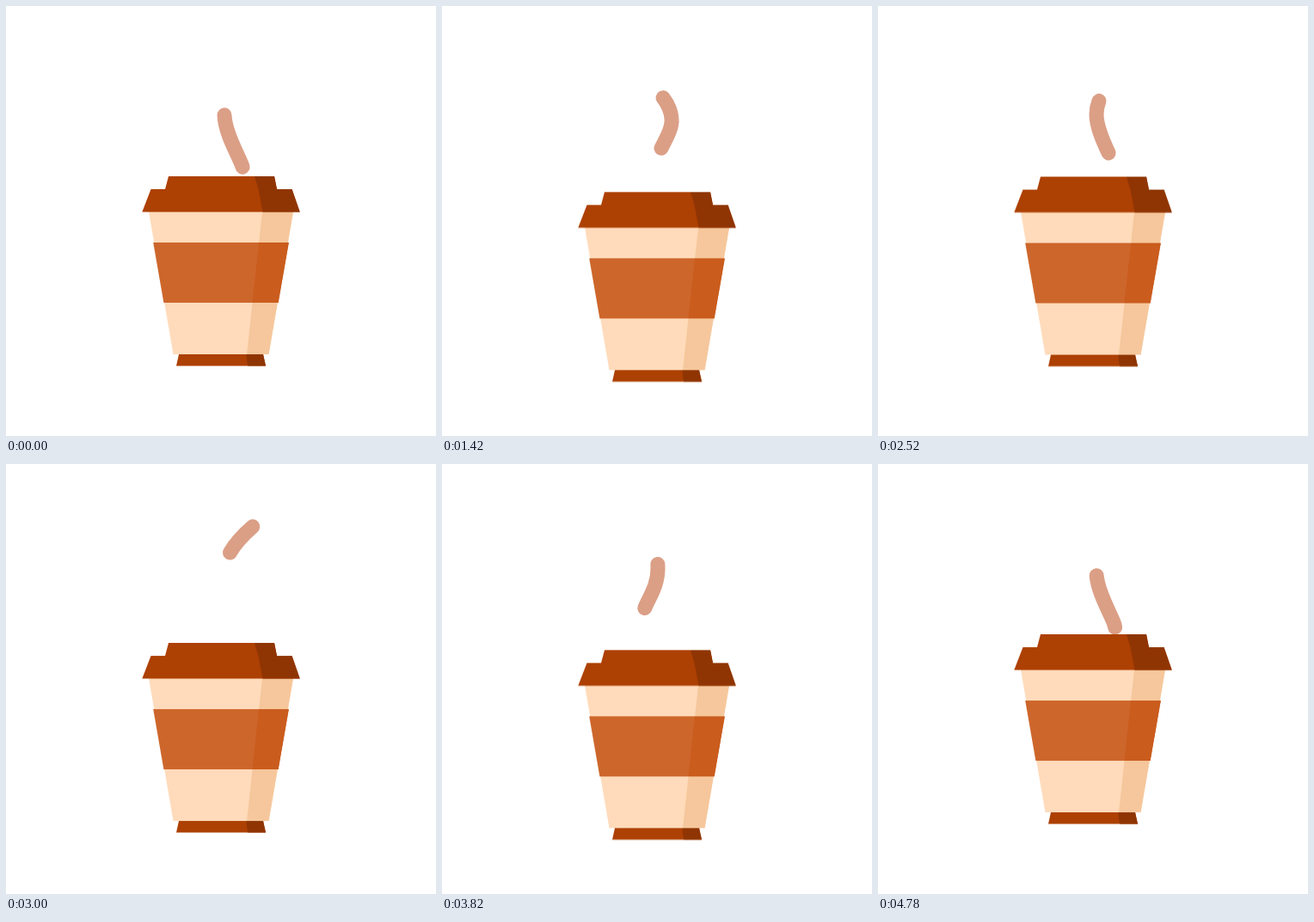
Recreate the animation shown at these times as an HTML page. Size 500 px wide and 500 px high, loop 4.8 s.

```html
<!DOCTYPE html>
<html lang="en">
<head>
<meta charset="utf-8">
<title>Coffee to go</title>
<style>
@property --tail { syntax: "<length>"; inherits: false; initial-value: 0px; }
@property --head { syntax: "<length>"; inherits: false; initial-value: 0px; }

html, body { margin: 0; width: 100%; height: 100%; overflow: hidden; background: #fff; }
svg { display: block; width: 100vw; height: 100vh; }

.cup { animation: bob 1200ms cubic-bezier(.364, 0, .636, 1) infinite alternate; }

/* Each wisp shows the part of its path between tail and head. */
.steam path {
  fill: none;
  stroke: #db9f86;
  stroke-width: 17;
  stroke-linecap: round;
  stroke-dasharray: calc(var(--head) - var(--tail)) 300px;
  stroke-dashoffset: calc(-1 * var(--tail));
  animation: head 4800ms cubic-bezier(.333, .59, .667, .97) infinite,
             tail 4800ms linear infinite,
             show 4800ms step-end infinite;
  animation-delay: var(--delay);
}

@keyframes bob { to { transform: translateY(20px); } }
@keyframes head {
  0% { --head: 0px; }
  31.25%, 100% { --head: 100px; }
}
@keyframes tail {
  0%, 6.875% { --tail: 0px; }
  31.25%, 100% { --tail: 100px; }
}
@keyframes show {
  0% { opacity: 1; }
  31.25%, 100% { opacity: 0; }
}

.lid { fill: #ad4003; }
.lid-shade { fill: #8f3503; }
.paper { fill: #ffdbbb; }
.paper-shade { fill: #f6c79c; }
.sleeve { fill: #cd662b; }
.sleeve-shade { fill: #ca5c1d; }
</style>
</head>
<body>
<svg viewBox="0 0 500 500">
  <defs>
    <path id="right" pathLength="100" d="M277 217C277 205 277 195 275 187C272 176 254 148 254 126C254 104 272 84 298 63.5"/>
  </defs>
  <g class="steam">
    <path style="--delay:-530ms" pathLength="100" d="M277 217C277 205 277 195 275 187C272 176 254 148 254 126C254 104 272 84 298 63.5"/>
    <path style="--delay:-4130ms" pathLength="100" d="M225 222C226 212 226 208 229 202C234 192 245 186 253 169C262 152 268 141 267 131C266 118 259 106 242 91C235 85 227 80 217 73"/>
    <path style="--delay:-2930ms" pathLength="100" d="M277 217C277 205 277 195 275 187C272 176 254 148 254 126C254 104 272 84 298 63.5"/>
    <path style="--delay:-1730ms" pathLength="100" d="M228 222C228 200 230 183 236 167C242 153 251 141 251 121C251 104 243 92 226 82"/>
  </g>
  <g class="cup">
    <path class="paper" d="M166 239H334L305.5 405H194.5Z"/>
    <path class="paper-shade" d="M298 239H334L305.5 405H280Z"/>
    <path class="sleeve" d="M171.2 275H328.8L316.6 345H183.4Z"/>
    <path class="sleeve-shade" d="M294.1 275H328.8L316.6 345H286.5Z"/>
    <path class="lid" d="M201 405H299L302 418.6H198Z"/>
    <path class="lid-shade" d="M279.3 405H299L302 418.6H281Z"/>
    <path class="lid" d="M189 198H312L315 213H332.5L341.7 239.5H158.3L168.5 213H185Z"/>
    <path class="lid-shade" d="M289 198H312L315 213H332.5L341.7 239.5H298.5L293.5 213Z"/>
  </g>
</svg>
</body>
</html>
```
